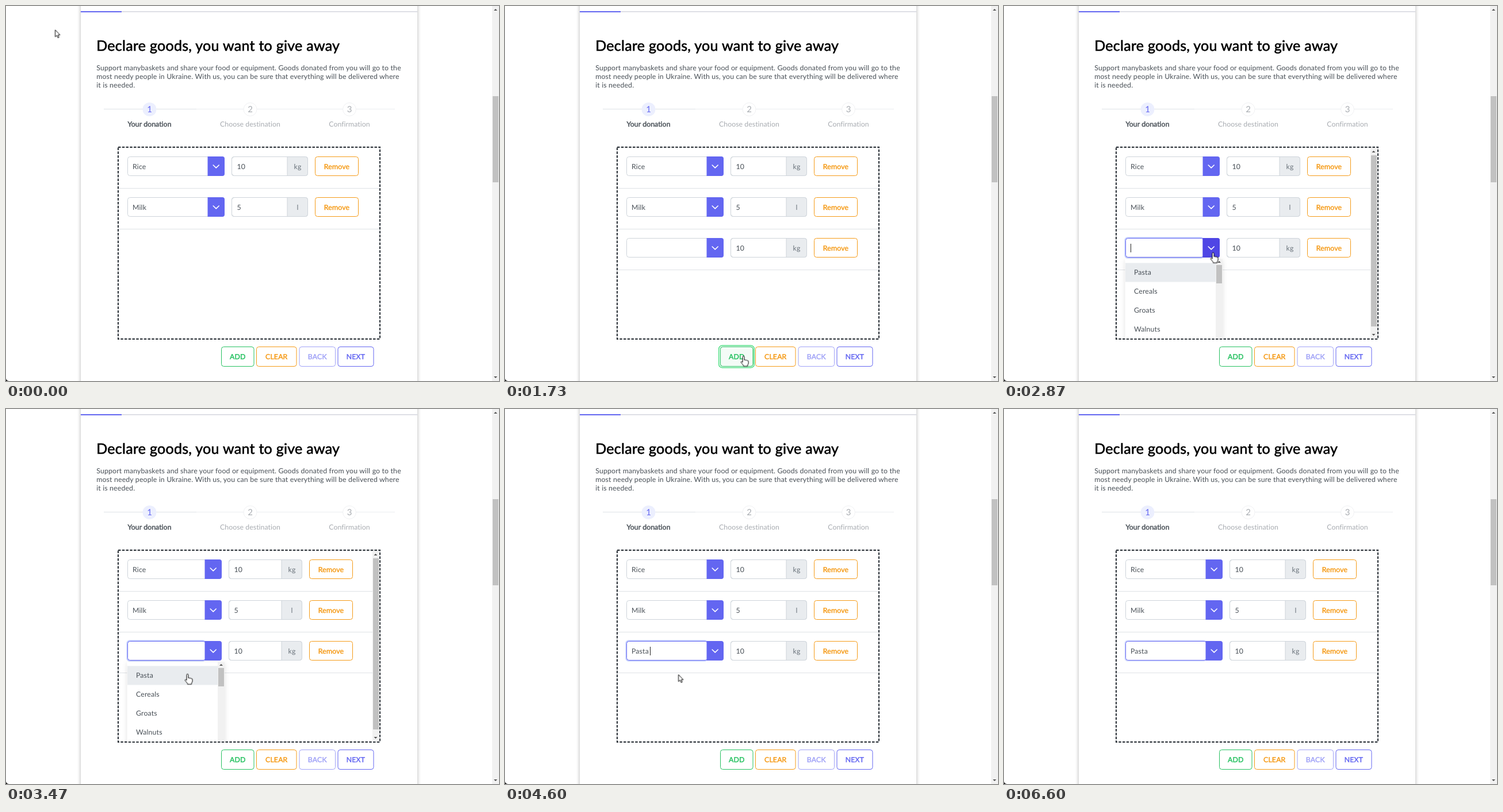
An HTML page for the animation above (6670 ms loop, 857 px wide and 653 px high).

```html
<!DOCTYPE html>
<html lang="en">
<head>
<meta charset="utf-8">
<title>Donation form</title>
<style>
html, body { margin: 0; width: 100%; height: 100%; overflow: hidden; background: #fff; }
svg { display: block; width: 100%; height: 100%; overflow: hidden; }
text { font: 12.3px Lato, "Open Sans", sans-serif; letter-spacing: .16px; text-rendering: geometricPrecision; }
.title { font-size: 25px; letter-spacing: .28px; stroke-width: .6px; }
.digit { font-size: 15px; letter-spacing: 0; }
.label { letter-spacing: .05px; }
.bold { stroke-width: .45px; }
.card { filter: drop-shadow(0 0 3px rgba(0, 0, 0, .3)); }
.menu { filter: drop-shadow(0 2px 4px rgba(0, 0, 0, .12)); }

.step { animation: 6670ms step-end infinite; }
.ease { animation: 6670ms linear infinite; }
.wide { animation-name: wide; }
.narrow { animation-name: narrow; }
.added { animation-name: added; }
.panel { animation-name: panel; }
.chosen { animation-name: chosen; }
.wide-focus { animation-name: wide-focus; }
.wide-ring { animation-name: wide-ring; }
.narrow-focus { animation-name: narrow-focus; }
.wide-hover { animation-name: wide-hover; }
.narrow-hover { animation-name: narrow-hover; }
.caret-empty { animation-name: caret-empty; }
.caret-end { animation-name: caret-end; }
.add-hover { animation-name: add-hover; }
.add-ring { animation-name: add-ring; }
.clear-hover { animation-name: clear-hover; }
.cursor { animation-name: cursor; }
.seen { animation-name: seen; }
.arrow { animation-name: arrow; }
.hand { animation-name: hand; }

@keyframes wide { 0%, 66%, 100% { opacity: 1 } 41% { opacity: 0 } }
@keyframes narrow { 0%, 66%, 100% { opacity: 0 } 41% { opacity: 1 } }
@keyframes added { 0% { opacity: 0 } 24%, 100% { opacity: 1 } }
@keyframes panel { 0%, 41%, 66%, 100% { opacity: 0 } 42.7%, 64% { opacity: 1 } }
@keyframes chosen { 0% { opacity: 0 } 64.5%, 100% { opacity: 1 } }
@keyframes wide-focus { 0% { opacity: 0 } 66%, 100% { opacity: 1 } }
@keyframes wide-ring { 0%, 98% { opacity: 1 } 100% { opacity: .3 } }
@keyframes narrow-focus { 0%, 41% { opacity: 0 } 43%, 100% { opacity: 1 } }
@keyframes wide-hover { 0%, 37% { opacity: 0 } 38.5%, 66% { opacity: 1 } 66.1%, 100% { opacity: 0 } }
@keyframes narrow-hover { 0%, 48% { opacity: 1 } 50%, 100% { opacity: 0 } }
@keyframes caret-empty { 0%, 47%, 64%, 100% { opacity: 0 } 41%, 55% { opacity: 1 } }
@keyframes caret-end { 0%, 75%, 91%, 100% { opacity: 0 } 64.5%, 83% { opacity: 1 } }
@keyframes add-hover { 0%, 17%, 32%, 100% { opacity: 0 } 19%, 30% { opacity: 1 } }
@keyframes add-ring { 0%, 23%, 39.3%, 100% { opacity: 0 } 25%, 37.3% { opacity: 1 } }
@keyframes clear-hover { 0%, 85%, 89%, 100% { opacity: 0 } 86%, 87% { opacity: 1 } }
@keyframes seen { 0% { opacity: 1 } 89%, 100% { opacity: 0 } }
@keyframes arrow { 0%, 31%, 66%, 88%, 100% { opacity: 1 } 16%, 37%, 86% { opacity: 0 } }
@keyframes hand { 0%, 31%, 66%, 88%, 100% { opacity: 0 } 16%, 37%, 86% { opacity: 1 } }
@keyframes cursor {
  0% { transform: translate(85.5px, 41.5px) }
  1% { transform: translate(87px, 44px) }
  3% { transform: translate(120px, 90px) }
  5% { transform: translate(185px, 210px) }
  7% { transform: translate(258px, 350px) }
  9% { transform: translate(318px, 475px) }
  11% { transform: translate(342px, 546px) }
  12% { transform: translate(337px, 580px) }
  13% { transform: translate(329px, 607px) }
  14% { transform: translate(345px, 628px) }
  15% { transform: translate(378px, 635px) }
  16% { transform: translate(406px, 628px) }
  17%, 21% { transform: translate(416.5px, 622.5px) }
  24% { transform: translate(415px, 611px) }
  26%, 28% { transform: translate(414.5px, 609.5px) }
  30% { transform: translate(410px, 588px) }
  33% { transform: translate(393px, 525px) }
  36% { transform: translate(371px, 452px) }
  38%, 46% { transform: translate(363.5px, 429.5px) }
  49% { transform: translate(340px, 446px) }
  52% { transform: translate(315.5px, 461.5px) }
  56%, 63% { transform: translate(314.5px, 462px) }
  69%, 75% { transform: translate(301.5px, 462.5px) }
  77% { transform: translate(320px, 470px) }
  80% { transform: translate(395px, 510px) }
  82% { transform: translate(445px, 537px) }
  84% { transform: translate(476px, 554px) }
  86% { transform: translate(477px, 600px) }
  88%, 100% { transform: translate(472px, 634px) }
}
</style>
</head>
<body>
<svg id="stage" viewBox="0 0 857 653"></svg>
<script>
const INK = '#495057', INDIGO = '#6366f1', DEEP = '#4a3fd8', RING = '#c7d2fe';
const LINE = '#ced4da', RULE = '#dee2e6', ORANGE = '#f59b18', GREEN = '#26c161', MUTED = '#a8acb1';
const TRACK = '#f1f1f1', THUMB = '#c1c1c1';

const rect = (x, y, w, h, fill, extra = '') =>
  `<rect x="${x}" y="${y}" width="${w}" height="${h}" fill="${fill}" ${extra}/>`;
const frame = (x, y, w, h, stroke, fill = '#fff') =>
  rect(x + .5, y + .5, w - 1, h - 1, fill, `rx="4" stroke="${stroke}"`);
const text = (x, y, words, fill = INK, kind = '', anchor = 'start') =>
  `<text x="${x}" y="${y}" fill="${fill}" class="${kind}" text-anchor="${anchor}"` +
  `${/bold|title/.test(kind) ? ` stroke="${fill}"` : ''}>${words}</text>`;
const centred = (x, y, words, fill, kind) => text(x, y, words, fill, kind, 'middle');
const group = (kind, ...parts) => `<g class="${kind}">${parts.join('')}</g>`;
const rightRounded = (x, y, w, h, fill) =>
  `<path d="M${x} ${y}h${w - 4}q4 0 4 4v${h - 8}q0 4-4 4h${4 - w}z" fill="${fill}"/>`;
const triangle = (x, y, dir) => `<path d="M${x - 3} ${y + 1.5 * dir}h6l-3 ${-3 * dir}z" fill="#505050"/>`;
const caret = (x, y) => rect(x, y, 1, 15, '#222');

function button(x, w, words, colour, ...under) {
  return frame(x, 593, w, 35, colour) + under.join('') + centred(x + w / 2, 615, words, colour, 'bold');
}

// A row's columns depend on the select's right edge, the unit's left edge and the rule's end.
function row(index, name, qty, unit, [selectEnd, unitX, ruleEnd], states = {}) {
  const y = 262 + 71 * index, base = y + 21.5, arrowX = selectEnd - 29.5;
  const qtyX = selectEnd + 12;
  return frame(211, y, selectEnd - 211, 34, LINE) +
    (states.focus ? states.focus(y, arrowX) : '') +
    rightRounded(arrowX, y, 29.5, 34, INDIGO) +
    (states.hover ? states.hover(y, arrowX) : '') +
    `<path d="M${arrowX + 9.7} ${y + 15}l5 4.8 5-4.8" fill="none" stroke="#fff" stroke-width="1.6" stroke-linecap="round" stroke-linejoin="round"/>` +
    group(states.name || '', text(220, base, name)) +
    frame(qtyX, y, unitX + 36 - qtyX, 34, LINE) +
    rightRounded(unitX, y + .5, 35.5, 33, '#e9ecef') +
    frame(qtyX, y, unitX + 36 - qtyX, 34, LINE, 'none') +
    rect(unitX - .5, y, 1, 34, LINE) +
    text(qtyX + 9.5, base, qty) + centred(unitX + 18, base, unit, '#6c757d') +
    frame(unitX + 48, y, 76, 34, ORANGE) + centred(unitX + 86, base, 'Remove', ORANGE, 'bold') +
    rect(196, y + 55, ruleEnd - 196, 1, RULE);
}

const focusBox = (kind, ringKind) => (y, arrowX) => group(kind,
  rect(209.3, y - 1.7, arrowX - 207, 37.4, RING, `rx="5.5" class="${ringKind}"`),
  frame(211, y, arrowX - 209, 34, INDIGO));
const hoverBox = (kind, ring, fill) => (y, x) => group(kind,
  ring ? rect(x - 1.5, y - 1.5, 32.5, 37, RING, 'rx="4"') : '', rightRounded(x, y, 29.5, 34, fill));

function rows(layout, third) {
  return row(0, 'Rice', '10', 'kg', layout) + row(1, 'Milk', '5', 'l', layout) +
    group('step added', row(2, 'Pasta', '10', 'kg', layout, { name: 'step chosen', ...third }));
}

function header() {
  const step = (x, n, label, on) =>
    `<circle cx="${x}" cy="180" r="${on ? 12 : 11.5}" fill="${on ? '#eceffe' : '#fff'}" stroke="${on ? 'none' : '#f0f1f3'}"/>` +
    centred(x, 185.3, n, on ? INDIGO : MUTED, 'digit') +
    centred(x, 210, label, on ? INK : MUTED, on ? 'label bold' : 'label');
  return rect(130, 9, 585, 1.7, '#d9dae2') + rect(130, 9, 71, 2, INDIGO) +
    text(157.2, 77.5, 'Declare goods, you want to give away', '#000', 'title') +
    text(157.2, 111.5, 'Support manybaskets and share your food or equipment. Goods donated from you will go to the') +
    text(157.2, 126.5, 'most needy people in Ukraine. With us, you can be sure that everything will be delivered where') +
    text(157.2, 141.5, 'it is needed.') +
    rect(170, 179, 161, 1, RULE) + rect(331, 179, 345, 1, '#ebedf0') +
    step(249.5, 1, 'Your donation', true) + step(424.5, 2, 'Choose destination') + step(597, 3, 'Confirmation');
}

function menu() {
  const items = ['Pasta', 'Cereals', 'Groats', 'Walnuts'];
  return group('ease panel', '<g clip-path="url(#inside)">',
    group('menu', rect(210.5, 440.5, 169.5, 160, '#fff')),
    rect(211, 447.5, 157.5, 33, '#e9ecef'),
    ...items.map((item, i) => text(226, 468.3 + 33 * i, item)),
    rect(368, 440.5, 12, 140, TRACK), rect(369, 451, 10, 32, THUMB), triangle(374, 445.5, 1), '</g>');
}

function cursor() {
  const style = 'fill="#fff" stroke="#000" stroke-linejoin="round"';
  return group('step seen', group('ease cursor',
    `<path class="step arrow" ${style} d="M0 0V12.2L2.8 9.6 4.6 13.8 6.6 13 4.8 8.9H8.4Z"/>`,
    `<path class="step hand" ${style} d="M-1.5 11V1.5a1.5 1.5 0 0 1 3 0V7q1.2-1 2.6.3 1.5-.7 2.5.6 1.8-.3 2 1.3V13l-1.6 3v1.8H0V16.3l-4-4.8q-1-1.6.4-2 1 0 2.1 1.5Z"/>`));
}

const innerBar = rect(637, 247, 12, 332, TRACK) + rect(638, 260, 10, 298, THUMB) +
  triangle(642.5, 253.5, 1) + triangle(642.5, 572.5, -1);
const pageBar = rect(845, 0, 12, 653, TRACK) + rect(846, 157, 10, 150, THUMB) +
  triangle(851, 6.5, 1) + triangle(851, 646.5, -1);
const dropZone = rect(195, 245.8, 455, 334, 'none',
  'stroke="#343a40" stroke-width="2.25" stroke-dasharray="4.5 2.25"');

document.getElementById('stage').innerHTML = [
  '<clipPath id="inside"><path d="M196 247h441v332h-441z"/></clipPath>',
  group('card', rect(130, -20, 585, 700, '#fff')),
  header(),
  dropZone,
  group('step wide', rows([380, 489, 649], {
    focus: focusBox('step wide-focus', 'ease wide-ring'),
    hover: hoverBox('ease wide-hover', true, DEEP)
  })),
  group('step narrow', rows([375, 479, 637], {
    focus: focusBox('ease narrow-focus', ''),
    hover: hoverBox('ease narrow-hover', false, '#4f46e5')
  }), innerBar),
  group('step caret-empty', caret(220, 414)),
  group('step caret-end', caret(252, 414)),
  menu(),
  group('ease add-ring', rect(371.8, 591.3, 61.4, 38.4, '#fff', 'rx="5.5" stroke="#4ade80" stroke-width="1.5"')),
  button(374, 57.5, 'ADD', GREEN, group('ease add-hover', frame(374, 593, 57.5, 35, GREEN, '#f3fbf6'))),
  button(435, 70.5, 'CLEAR', ORANGE, group('ease clear-hover', frame(435, 593, 70.5, 35, ORANGE, '#fffaf2'))),
  button(509.5, 63.5, 'BACK', '#a1a3f7'),
  button(576.5, 63, 'NEXT', INDIGO),
  pageBar,
  '<path d="M0 648.5Q.5 652.5 5 653H0Z"/>',
  cursor()
].join('');
</script>
</body>
</html>
```
